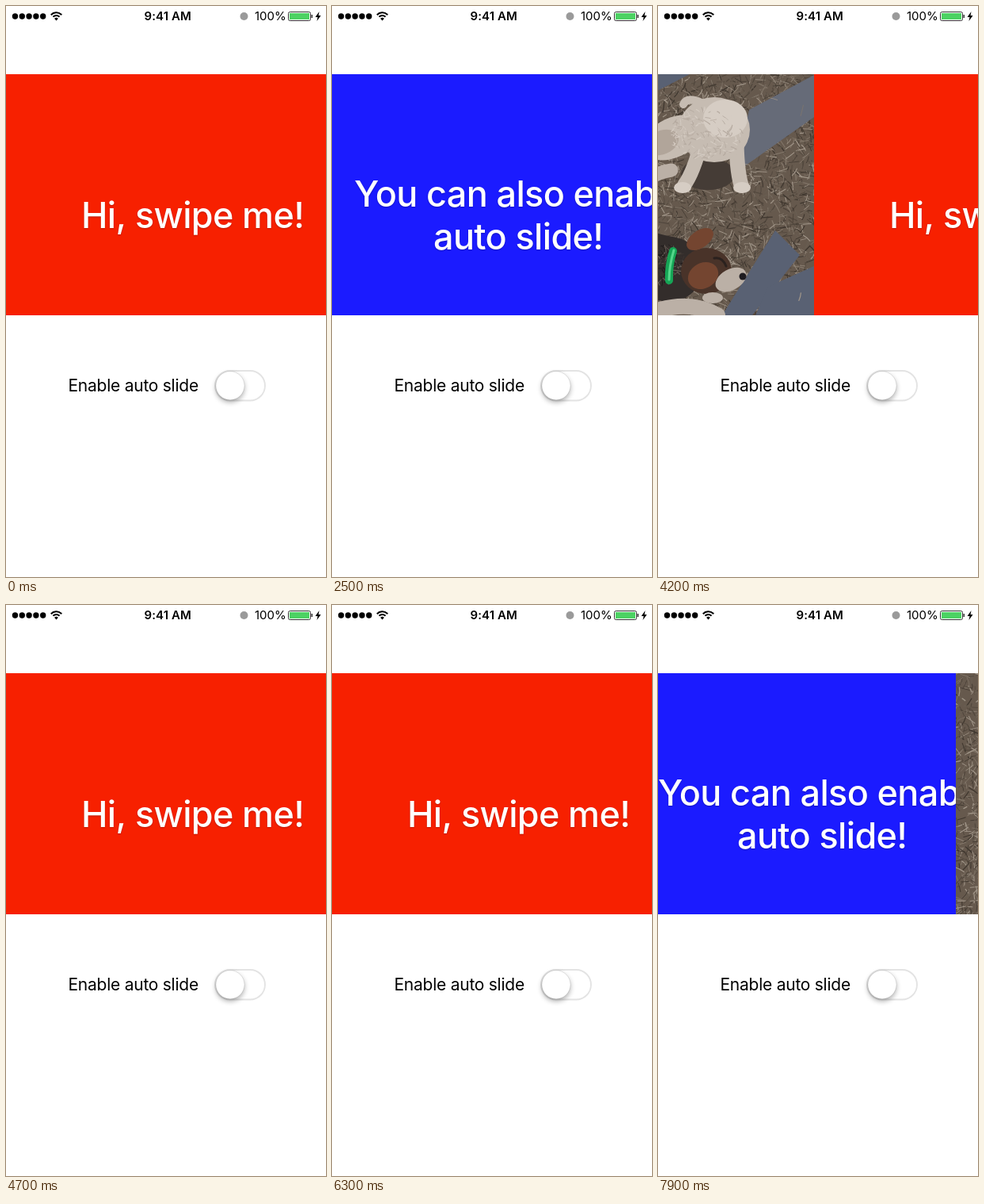
Write an HTML page with a canvas that moves like this. It is 404x720 px and loops after 8000 ms.

```html
<!DOCTYPE html>
<html lang="en">
<head>
<meta charset="utf-8">
<title>Slide show</title>
<style>
html, body { margin: 0; width: 100%; height: 100%; overflow: hidden; background: #fff; }
canvas { display: block; width: 404px; height: 720px; }
</style>
</head>
<body>
<canvas id="stage"></canvas>
<script>
const W = 404, H = 720, TOP = 86, BOTTOM = 390, LOOP = 8000, STEP = 100, SWIPE = 700;
const dpr = window.devicePixelRatio || 1;
const FONT = 'Inter, Roboto, sans-serif';

function setUp(canvas, w, h) {
  canvas.width = w * dpr;
  canvas.height = h * dpr;
  const c = canvas.getContext('2d');
  c.scale(dpr, dpr);
  return c;
}

const ctx = setUp(document.getElementById('stage'), W, H);
const photo = document.createElement('canvas');

let seed = 77;
const rnd = () => (seed = seed * 16807 % 2147483647) / 2147483647;

function text(str, x, y, size, weight, color, spacing) {
  ctx.font = `${weight} ${size}px ${FONT}`;
  ctx.letterSpacing = spacing + 'px';
  ctx.fillStyle = color;
  ctx.fillText(str, x, y);
}

function oval(c, color, x, y, rx, ry = rx, turn = 0) {
  c.fillStyle = color;
  c.beginPath();
  c.ellipse(x, y, rx, ry, turn, 0, Math.PI * 2);
  c.fill();
}

function poly(c, color, ...p) {
  c.fillStyle = color;
  c.beginPath();
  for (let i = 0; i < p.length; i += 2) c.lineTo(p[i], p[i + 1]);
  c.fill();
}

function limb(c, color, width, x0, y0, cx, cy, x1, y1) {
  c.strokeStyle = color;
  c.lineWidth = width;
  c.lineCap = 'round';
  c.beginPath();
  c.moveTo(x0, y0);
  c.quadraticCurveTo(cx, cy, x1, y1);
  c.stroke();
}

// Short random strokes; spot() picks where each one lies.
function hairs(c, count, tones, size, spot) {
  for (let i = 0; i < count; i++) {
    const [x, y] = spot(), a = rnd() * Math.PI, r = size * (0.4 + rnd());
    const dx = Math.cos(a) * r, dy = Math.sin(a) * r;
    limb(c, tones[Math.floor(rnd() * tones.length)], 0.6 + rnd() * 0.7,
      x - dx, y - dy, x + rnd() * 2, y, x + dx, y + dy);
  }
}

const anywhere = () => [rnd() * W, TOP + rnd() * (BOTTOM - TOP)];

function within(x, y, rx, ry) {
  return () => {
    const a = rnd() * Math.PI * 2, r = Math.sqrt(rnd());
    return [x + Math.cos(a) * r * rx, y + Math.sin(a) * r * ry];
  };
}

function paintGround(c) {
  const straw = ['#a2978a', '#84786b', '#3f372f', '#51473d', '#695e52'];
  c.fillStyle = '#66594d';
  c.fillRect(0, TOP, W, BOTTOM - TOP);
  hairs(c, 5000, straw, 5, anywhere);

  const slate = '#596173';
  poly(c, slate, 97, 85, 249, 85, 196, 112, 153, 144);
  poly(c, slate, 112, 152, 196, 162, 155, 376, 70, 364);
  poly(c, '#666b78', 404, 87, 322, 131, 305, 210, 404, 140);
  poly(c, slate, 355, 283, 386, 314, 326, 390, 288, 390);
  poly(c, slate, 404, 328, 346, 354, 330, 390, 404, 390);
  hairs(c, 90, straw, 5, anywhere);
}

function paintPalePup(c) {
  const pale = '#c6bcb2', light = '#d6cdc4';
  oval(c, '#453c36', 270, 212, 34, 20);
  limb(c, pale, 18, 262, 170, 252, 210, 240, 226);
  limb(c, pale, 19, 306, 165, 306, 205, 312, 226);
  limb(c, pale, 10, 262, 122, 244, 114, 239, 124);
  oval(c, pale, 226, 166, 40, 25, -0.45);
  oval(c, pale, 278, 156, 45, 41);
  oval(c, light, 292, 142, 28, 24);
  oval(c, '#b1a59a', 212, 172, 22, 15, -0.4);
  oval(c, light, 238, 229, 11, 7);
  oval(c, light, 313, 229, 11, 7);
  hairs(c, 160, ['#b5aaa0', light], 3, within(268, 160, 46, 32));
}

function paintDarkPup(c) {
  const dark = '#332d2b', white = '#bbb0a6', brown = '#744530';
  limb(c, '#85756a', 15, 160, 196, 172, 188, 188, 174);
  limb(c, white, 17, 174, 242, 190, 212, 224, 207);
  limb(c, dark, 16, 46, 243, 72, 248, 105, 228);
  oval(c, '#aaa198', 43, 235, 5);
  oval(c, dark, 140, 224, 42, 29, -0.35);
  limb(c, dark, 82, 127, 246, 130, 318, 222, 332);
  hairs(c, 420, ['#241f1e', '#403935', '#574d47'], 4, within(138, 268, 42, 58));
  hairs(c, 300, ['#1f1b1b', '#3c3430', '#6b6059'], 4, within(190, 324, 50, 28));
  limb(c, white, 20, 210, 383, 250, 372, 282, 390);
  oval(c, '#493329', 268, 334, 32, 29);
  oval(c, white, 299, 345, 21, 13, -0.5);
  oval(c, white, 276, 368, 13, 7);
  oval(c, brown, 260, 294, 19, 11, -0.6);
  oval(c, brown, 264, 340, 20, 16, -0.5);
  limb(c, '#2a211e', 3, 278, 318, 288, 316, 293, 328);
  oval(c, '#1f1c20', 314, 341, 4.5);
  limb(c, '#16a556', 10, 226, 309, 220, 328, 221, 346);
  limb(c, '#55d68a', 3, 227, 308, 221, 328, 221, 345);
}

function paintPhoto() {
  const c = setUp(photo, W, BOTTOM);
  paintGround(c);
  paintPalePup(c);
  paintDarkPup(c);
}

function shade(alpha, blur, drop) {
  ctx.shadowColor = `rgba(0,0,0,${alpha})`;
  ctx.shadowBlur = blur * dpr;
  ctx.shadowOffsetY = drop * dpr;
}

function caption(str, x, y) {
  shade(0.25, 2, 1);
  text(str, x, y, 45, 500, '#fff', -0.65);
  shade(0, 0, 0);
}

function fillSlide(color) {
  ctx.fillStyle = color;
  ctx.fillRect(0, TOP, W, BOTTOM - TOP);
}

const slides = [
  () => {
    fillSlide('#f72000');
    caption('Hi, swipe me!', 95, 280);
  },
  () => {
    fillSlide('#1b1bff');
    caption('You can also enable', 28, 253);
    caption('auto slide!', 128, 307);
  },
  () => ctx.drawImage(photo, 0, 0, W, BOTTOM)
];

// Four swipes forward, then back again: start time and direction.
const swipes = [[1500, 1], [3123, 1], [3950, 1], [4780, 1], [5580, -1], [6480, -1], [7408, -1]];

function position(t) {
  return swipes.reduce((pos, [start, dir]) => {
    const u = Math.min(1, Math.max(0, (t - start) / SWIPE));
    return pos + dir * (1 - Math.pow(1 - Math.pow(u, 1.5), 3));
  }, 0);
}

function drawSlides(t) {
  const pos = position(t), first = Math.floor(pos + 1e-6);
  for (let i = first; i <= first + 1; i++) {
    const x = Math.round((i - pos) * W);
    if (x >= W) continue;
    ctx.save();
    ctx.beginPath();
    ctx.rect(x, TOP, W, BOTTOM - TOP);
    ctx.clip();
    ctx.translate(x, 0);
    slides[i % slides.length]();
    ctx.restore();
  }
}

function drawStatus() {
  for (let i = 0; i < 5; i++) oval(ctx, '#000', 11.5 + i * 8.8, 13, 3.7);
  ctx.strokeStyle = '#000';
  ctx.lineCap = 'butt';
  ctx.lineWidth = 2;
  for (const r of [5.6, 9.2]) {
    ctx.beginPath();
    ctx.arc(63.5, 17.5, r, -Math.PI * 0.76, -Math.PI * 0.24);
    ctx.stroke();
  }
  poly(ctx, '#000', 63.5, 18.5, 61, 15.8, 63.5, 14.6, 66, 15.8);
  text('9:41 AM', 174.5, 18, 15, 600, '#000', 0.1);
  oval(ctx, '#9a9a9a', 300.5, 13, 5);
  text('100%', 314, 18, 15, 400, '#000', 0);
  ctx.strokeStyle = '#333';
  ctx.lineWidth = 1;
  ctx.beginPath();
  ctx.roundRect(356.5, 7.5, 28, 11, 2);
  ctx.stroke();
  ctx.fillStyle = '#4cd263';
  ctx.fillRect(358, 9, 25, 8);
  ctx.fillStyle = '#333';
  ctx.fillRect(385.5, 11, 1.5, 4);
  poly(ctx, '#000', 395.5, 7, 390.5, 14, 393.5, 14, 392.5, 19, 397.5, 12, 394.5, 12);
}

function drawSwitch() {
  text('Enable auto slide', 78.5, 486, 21, 400, '#000', -0.25);
  ctx.lineWidth = 1.8;
  ctx.strokeStyle = '#e3e3e3';
  ctx.beginPath();
  ctx.roundRect(264, 460, 63, 37.5, 18.75);
  ctx.stroke();
  shade(0.32, 6, 3);
  oval(ctx, '#fff', 283, 478.7, 18);
  shade(0, 0, 0);
  ctx.strokeStyle = 'rgba(0,0,0,.13)';
  ctx.lineWidth = 0.8;
  ctx.stroke();
}

function draw(now) {
  const t = Math.floor((now % LOOP) / STEP) * STEP;
  ctx.fillStyle = '#fff';
  ctx.fillRect(0, 0, W, H);
  drawSlides(t);
  drawStatus();
  drawSwitch();
  requestAnimationFrame(draw);
}

paintPhoto();
requestAnimationFrame(draw);
</script>
</body>
</html>
```
